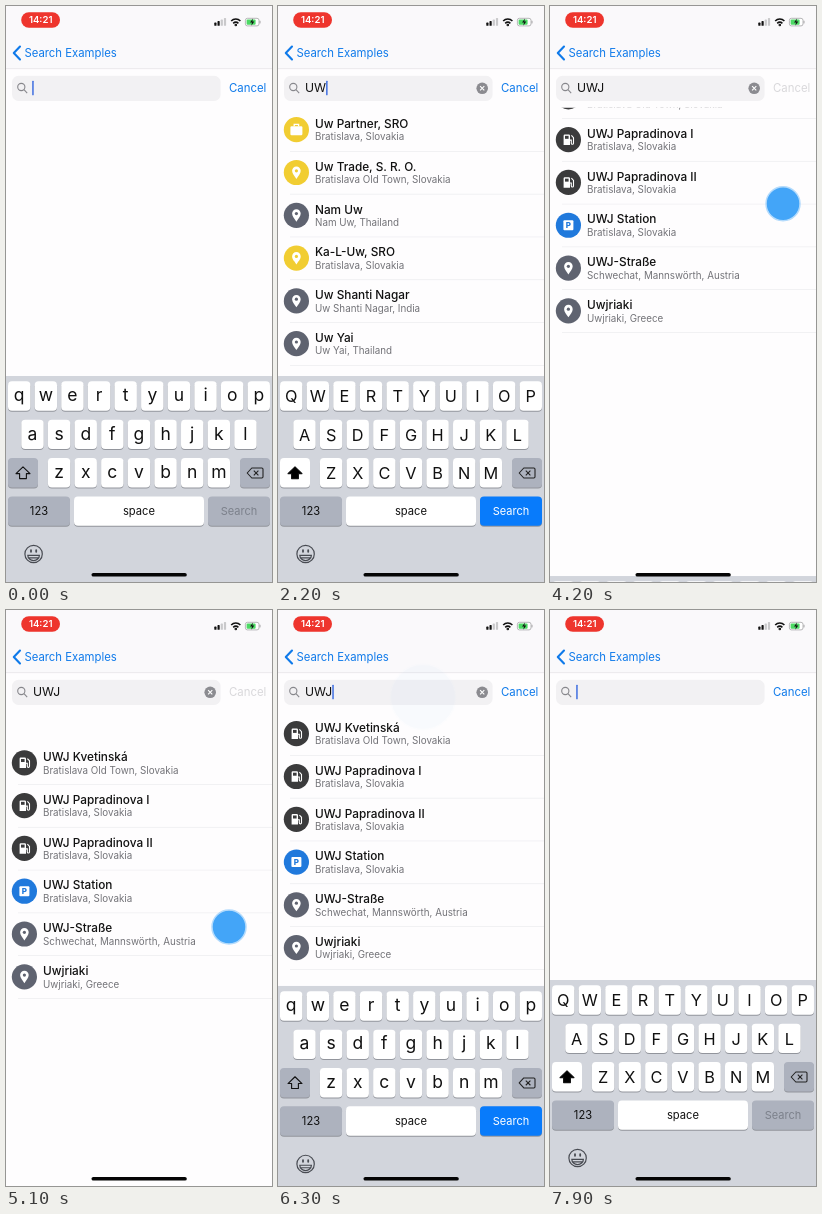
These frames come from a looping animation (266x576 px, 8000 ms). An HTML page:

```html
<!DOCTYPE html>
<html lang="en">
<head>
<meta charset="utf-8">
<title>Search</title>
<style>
html, body { margin: 0; width: 100%; height: 100%; overflow: hidden; background: #fff; }
svg { display: block; width: 100vw; height: 100vh; font-family: Inter, "Noto Sans", sans-serif; }
.mid { text-anchor: middle; }
.title { font-size: 11.8px; font-weight: 500; fill: #111; }
.place { font-size: 9.8px; fill: #737378; }
</style>
</head>
<body>
<svg id="stage" viewBox="0 0 266 576">
  <defs>
    <clipPath id="listArea"><rect y="101.8" width="266" height="475"/></clipPath>
    <filter id="soft" x="-30%" y="-30%" width="160%" height="160%"><feGaussianBlur stdDeviation="0.6"/></filter>
    <g id="pin">
      <path d="M0 6.4C-1.9 3.2-4.3 1.1-4.3-1.7a4.3 4.3 0 0 1 8.6 0C4.3 1.1 1.9 3.2 0 6.4Z" fill="#fff"/>
      <circle cy="-1.7" r="1.6" fill="currentColor"/>
    </g>
    <g id="bag">
      <rect x="-6" y="-3.4" width="12" height="9" rx="1.2" fill="#fff"/>
      <path d="M-2.2-3.4v-2h4.4v2" fill="none" stroke="#fff" stroke-width="1.3"/>
    </g>
    <g id="pump">
      <path d="M-4.8 5.3V-4a1.2 1.2 0 0 1 1.2-1.2h4a1.2 1.2 0 0 1 1.2 1.2V5.3Z" fill="#fff"/>
      <rect x="-3.4" y="-3.8" width="3.6" height="3" fill="currentColor"/>
      <path d="M1.6.5h1.3v3a1.1 1.1 0 0 0 2.2 0V-2L3-4.3" fill="none" stroke="#fff" stroke-width="1.1"/>
    </g>
    <g id="parking">
      <rect x="-5" y="-5" width="10" height="10" rx="1" fill="#fff"/>
      <text class="mid" y="2.9" font-size="8" font-weight="800" fill="currentColor">P</text>
    </g>
  </defs>

  <rect width="266" height="576" fill="#fefdfe"/>
  <g clip-path="url(#listArea)"><g id="lists"></g></g>

  <rect width="266" height="63" fill="#faf9fb"/>
  <rect y="62.4" width="266" height=".7" fill="#e4e3e6"/>
  <rect x="15.2" y="6.3" width="38.8" height="15.4" rx="7.7" fill="#ee352d"/>
  <text class="mid" x="34.7" y="17.4" font-size="9.6" font-weight="600" fill="#fff">14:21</text>
  <g id="signal"></g>
  <g fill="none" stroke="#111" stroke-width="1.6">
    <path d="M225.2 15a6.4 6.4 0 0 1 9.2 0M227.2 17.3a3.8 3.8 0 0 1 5.2 0"/>
    <circle cx="229.8" cy="19" r=".5"/>
  </g>
  <rect x="239.4" y="12.3" width="13.6" height="7.6" rx="2" fill="#fff" stroke="#a4a4a6" stroke-width=".8"/>
  <rect x="240.6" y="13.5" width="9" height="5.2" rx="1" fill="#4cd964"/>
  <path d="M254 14.8v2.6" stroke="#a4a4a6"/>
  <path d="M247 12.6l-3 4h2l-.7 3.2 3-4.2h-2Z" fill="#111"/>
  <path d="M14 40.5l-6.2 6.5 6.2 6.5" fill="none" stroke="#0f7aea" stroke-width="2.1" stroke-linecap="round" stroke-linejoin="round"/>
  <text x="18.4" y="51.2" font-size="11.35" fill="#0f7aea">Search Examples</text>

  <rect x="6" y="69.8" width="208.6" height="25.2" rx="6.5" fill="#f2f1f3"/>
  <g fill="none" stroke="#87878c" stroke-width="1.1"><circle cx="15.3" cy="81" r="3.6"/><path d="M18 83.7l3.2 3.4"/></g>
  <text id="query" x="27" y="86.3" font-size="12.2" fill="#111"></text>
  <rect id="caret" y="74.7" width="1.5" height="14.6" rx=".6" fill="#3f6fe0"/>
  <g id="clear">
    <circle cx="204.2" cy="82.3" r="5.8" fill="#8b8b90"/>
    <path d="M202.1 80.2l4.2 4.2m0-4.2l-4.2 4.2" stroke="#fff" stroke-width="1.1"/>
  </g>
  <text id="cancel" x="223" y="86.3" font-size="11.4">Cancel</text>

  <g id="keyboard">
    <rect y="370" width="266" height="210" fill="#d2d5dc"/>
    <g id="keys"></g>
    <path id="shift" d="M17 460.8l-7 6.8h3.6v5h6.8v-5h3.6Z" stroke="#111" stroke-width="1.1" stroke-linejoin="round"/>
    <g fill="none" stroke="#222" stroke-width="1.1" stroke-linejoin="round">
      <path d="M241.2 467l4.6-5h10a1.2 1.2 0 0 1 1.2 1.2v7.6a1.2 1.2 0 0 1-1.2 1.2h-10Z"/>
      <path d="M247.8 464.7l4.6 4.6m0-4.6l-4.6 4.6"/>
    </g>
    <g fill="none" stroke="#484b52" stroke-width="1.2">
      <circle cx="27.6" cy="548" r="8.7"/>
      <path d="M21.8 549.3h11.6a5.8 5.3 0 0 1-11.6 0ZM22.4 551.8h10.4"/>
      <path d="M25 544.2v1.6m5.2-1.6v1.6" stroke-width="1.8" stroke-linecap="round"/>
    </g>
    <g id="popup">
      <path d="M-16-45a6 6 0 0 1 6-6h20a6 6 0 0 1 6 6v22c0 5-4.8 5-4.8 10V10a4 4 0 0 1-4 4h-14.4a4 4 0 0 1-4-4v-23c0-5-4.8-5-4.8-10Z" fill="#fff" stroke="#b9bcc3" stroke-width=".6"/>
      <text id="popupLetter" class="mid" y="-25" font-size="25"></text>
    </g>
  </g>
  <rect x="85.5" y="566.9" width="95.3" height="3.7" rx="1.85" fill="#050505"/>
  <circle id="touch" fill="#43a5f8" stroke="#b4dbfc" stroke-width="1.5" filter="url(#soft)"/>
</svg>
<script>
const LOOP = 8000, ROW = 42.8, KEYBOARD_TRAVEL = 206;
const $ = id => document.getElementById(id);
const set = (node, attrs) => { for (const k in attrs) node.setAttribute(k, attrs[k]); };
const show = (node, on) => set(node, { visibility: on ? "visible" : "hidden" });
const clamp = x => Math.max(0, Math.min(1, x));
const settle = (dt, tau) => dt <= 0 ? 1 : (1 + dt / tau) * Math.exp(-dt / tau);

const COLORS = { bag: "#f1cd32", yellowPin: "#f1cd32", pin: "#5f6370", pump: "#3b3b3c", parking: "#2079dc" };
const BRATISLAVA = "Bratislava, Slovakia", OLD_TOWN = "Bratislava Old Town, Slovakia";
const RESULTS = [
  [
    ["bag", "Uw Partner, SRO", BRATISLAVA],
    ["yellowPin", "Uw Trade, S. R. O.", OLD_TOWN],
    ["pin", "Nam Uw", "Nam Uw, Thailand"],
    ["yellowPin", "Ka-L-Uw, SRO", BRATISLAVA],
    ["pin", "Uw Shanti Nagar", "Uw Shanti Nagar, India"],
    ["pin", "Uw Yai", "Uw Yai, Thailand"]
  ],
  [
    ["pump", "UWJ Kvetinská", OLD_TOWN],
    ["pump", "UWJ Papradinova I", BRATISLAVA],
    ["pump", "UWJ Papradinova II", BRATISLAVA],
    ["parking", "UWJ Station", BRATISLAVA],
    ["pin", "UWJ-Straße", "Schwechat, Mannswörth, Austria"],
    ["pin", "Uwjriaki", "Uwjriaki, Greece"]
  ]
];

function rowMarkup([kind, title, place], i) {
  const y = 123.8 + i * ROW, icon = kind === "yellowPin" ? "pin" : kind;
  return `<g transform="translate(0 ${y})">
    <g transform="translate(18.4 -.1)" color="${COLORS[kind]}"><circle r="12.6" fill="currentColor"/><use href="#${icon}"/></g>
    <text class="title" x="37" y="-1.9">${title}</text>
    <text class="place" x="37" y="10.7">${place}</text>
    <rect x="12" y="21.2" width="254" height=".7" fill="#ececef"/></g>`;
}
$("lists").innerHTML = RESULTS.map(rows => `<g>${rows.map(rowMarkup).join("")}</g>`).join("");
const lists = [...$("lists").children];

$("signal").innerHTML = [0, 1, 2, 3].map(i =>
  `<rect x="${208.3 + i * 3.2}" y="${16.6 - i * 1.5}" width="2.2" height="${3.2 + i * 1.5}" rx=".6" fill="${i < 2 ? "#111" : "#c9c9cb"}"/>`).join("");

function keyMarkup(x, y, w, fill, label = "", size = 11.2, id = "") {
  return `<rect x="${x}" y="${y + 1}" width="${w}" height="29.4" rx="4" fill="#92959c"/>
    <rect id="${id}Face" x="${x}" y="${y}" width="${w}" height="29.4" rx="4" fill="${fill}"/>
    <text id="${id}Label" class="mid" x="${x + w / 2}" y="${y + 18.8}" font-size="${size}" fill="#111">${label}</text>`;
}
const GRAY = "#adb2be", keyPlaces = {};
let keysMarkup = "";
["qwertyuiop", "asdfghjkl", "zxcvbnm"].forEach((letters, row) => {
  [...letters].forEach((c, i) => {
    const x = [13.2, 26.5, 53.1][row] + i * 26.62, y = 375.3 + row * 38.4;
    keyPlaces[c] = [x, y + 15];
    keysMarkup += keyMarkup(x - 11.2, y, 22.4, "#fff", "", 17.5, c);
  });
});
$("keys").innerHTML = keysMarkup +
  keyMarkup(2, 452.1, 30, GRAY, "", 11, "shift") + keyMarkup(234, 452.1, 30, GRAY, "", 11, "delete") +
  keyMarkup(2, 490.4, 62, GRAY, "123", 11.2, "digits") + keyMarkup(68, 490.4, 130, "#fff", "space", 11.2, "space") +
  keyMarkup(202, 490.4, 62, GRAY, "Search", 11, "search");

const PRESSES = [[1300, "u"], [1930, "w"], [2500, "j"]];
const CLEAR_AT = 6850, HIDE_AT = 3850, RAISE_AT = 5950;

// Finger path while dragging the list: [time, x, y]
const DRAG = [[3600, 235, 261], [3820, 235, 261], [4230, 233, 197], [5080, 223, 317], [5350, 223, 317]];
const TAPS = [[5880, 6050, 145, 87], [6720, 6870, 204, 82]];

function dragPoint(t) {
  let i = 0;
  while (i < DRAG.length - 2 && t > DRAG[i + 1][0]) i++;
  const [a, b] = [DRAG[i], DRAG[i + 1]];
  const p = (1 - Math.cos(Math.PI * clamp((t - a[0]) / (b[0] - a[0])))) / 2;
  return [a[1] + (b[1] - a[1]) * p, a[2] + (b[2] - a[2]) * p];
}

function scrollOffset(t) {
  return 0.52 * (dragPoint(t)[1] - 261) * settle(t - 5350, 80);
}

function drawTouch(t) {
  const gestures = [[3600, 5350, ...dragPoint(t)], ...TAPS];
  const active = gestures.find(([from, to]) => t >= from && t < to + 350);
  show($("touch"), active);
  if (!active) return;
  const [from, to, x, y] = active;
  const fade = clamp((t - to) / 350);
  set($("touch"), {
    cx: x, cy: y, r: 17 + 17 * (1 - (1 - fade) ** 2),
    opacity: clamp((t - from + 30) / 120) * (1 - fade) ** 3
  });
}

function drawKeyboard(t, text) {
  const upper = (t >= 500 && t < HIDE_AT + 400) || t >= 7500;
  const drop = t < RAISE_AT ? 1 - settle(t - HIDE_AT, 65) : settle(t - RAISE_AT, 65);
  set($("keyboard"), { transform: `translate(0 ${KEYBOARD_TRAVEL * drop})` });
  for (const c in keyPlaces) {
    const label = $(c + "Label");
    label.textContent = upper ? c.toUpperCase() : c;
    set(label, { y: keyPlaces[c][1] + (upper ? 6.1 : 4.8), "font-size": upper ? 16.3 : 17.5 });
  }
  set($("shiftFace"), { fill: upper ? "#fff" : GRAY });
  set($("shift"), { fill: upper ? "#000" : "none" });
  set($("searchFace"), { fill: text ? "#087bfb" : GRAY });
  set($("searchLabel"), { fill: text ? "#fff" : "#7c818b" });

  const press = PRESSES.find(([at]) => t >= at - 60 && t < at + 90);
  show($("popup"), press);
  if (press) {
    set($("popup"), { transform: `translate(${keyPlaces[press[1]]})` });
    $("popupLetter").textContent = press[1].toUpperCase();
  }
}

function draw(t) {
  const typed = PRESSES.filter(([at]) => t >= at).map(p => p[1].toUpperCase()).join("");
  const text = t < CLEAR_AT ? typed : "";
  const editing = t < HIDE_AT || t >= RAISE_AT + 50;
  const blinkOff = t % 1000 >= 450 && t % 1000 < 750;
  const justTyped = PRESSES.some(([at]) => t >= at && t < at + 400);

  $("query").textContent = text;
  set($("caret"), { x: text ? 27 + $("query").getComputedTextLength() : 26.2 });
  show($("caret"), editing && (justTyped || !blinkOff));
  show($("clear"), text);
  set($("cancel"), { fill: editing ? "#0f7aea" : "#d9d8db" });

  show(lists[0], text && t >= 1600 && t < 2850);
  show(lists[1], text && t >= 2850);
  set($("lists"), { transform: `translate(0 ${scrollOffset(t)})` });
  drawKeyboard(t, text);
  drawTouch(t);
}

const start = performance.now();
function tick() {
  draw((performance.now() - start) % LOOP);
  requestAnimationFrame(tick);
}
tick();
</script>
</body>
</html>
```
